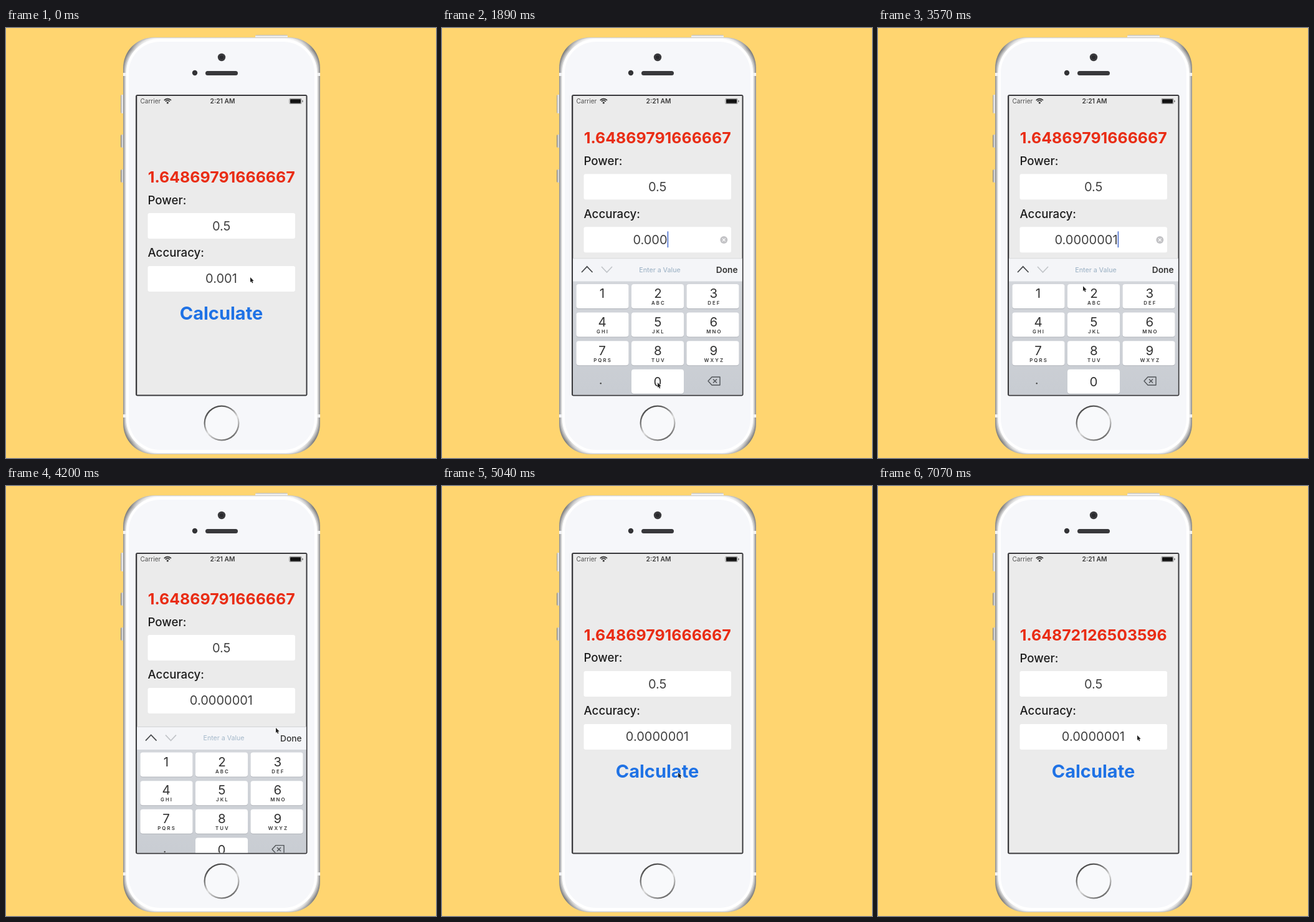
Recreate the animation shown at these times as an HTML page with a canvas. Size 690 px wide and 690 px high, loop 7.14 s.

```html
<!DOCTYPE html>
<html lang="en">
<head>
<meta charset="utf-8">
<title>Power calculator</title>
<style>
html, body { margin: 0; width: 100%; height: 100%; overflow: hidden; background: #ffd570; }
canvas { display: block; width: 690px; height: 690px; filter: blur(0.45px); }
</style>
</head>
<body>
<canvas id="stage" width="690" height="690"></canvas>
<script>
const ctx = document.getElementById('stage').getContext('2d');
const LOOP = 7140, STEP = 70;
const FOCUS = 320, BLUR = 4175, PRESS = 5600, RELEASE = 5740;

// [time, text] of the accuracy field
const edits = [
  [FOCUS, '0.001'], [1260, '0.00'], [1890, '0.000'], [2030, '0.0000'],
  [2200, '0.00000'], [2380, '0.000000'], [3220, '0.0000001']
];

// [time, x, y] of the pointer tip
const path = [
  [0, 392, 400], [420, 392, 400], [910, 447, 538], [1120, 438, 565],
  [1400, 438, 565], [1750, 346, 569], [2450, 346, 569], [2800, 279, 533],
  [3080, 258, 430], [3400, 258, 430], [3850, 446, 388], [4060, 441, 387],
  [4200, 433, 388], [4830, 379, 460], [6300, 379, 460], [7070, 416, 400]
];

const clamp = v => Math.max(0, Math.min(1, v));
const mix = (a, b, k) => a + (b - a) * k;

function spring(ms) {
  const w = 0.018 * Math.max(0, ms);
  return 1 - (1 + w) * Math.exp(-w);
}

function text(str, x, y, size, weight, color, align = 'left', spacing = 0) {
  ctx.font = `${weight} ${size}px Inter, Roboto, sans-serif`;
  ctx.letterSpacing = spacing + 'px';
  ctx.textAlign = align;
  ctx.fillStyle = color;
  ctx.fillText(str, x + (align === 'center' ? spacing / 2 : 0), y);
  ctx.letterSpacing = '0px';
}

function box(x, y, w, h, r, fill) {
  ctx.beginPath();
  ctx.roundRect(x, y, w, h, r);
  ctx.fillStyle = fill;
  ctx.fill();
}

function disc(x, y, r, fill) {
  ctx.beginPath();
  ctx.arc(x, y, r, 0, Math.PI * 2);
  ctx.fillStyle = fill;
  ctx.fill();
}

function line(points, color, width, close) {
  ctx.beginPath();
  points.forEach(([x, y]) => ctx.lineTo(x, y));
  if (close) ctx.closePath();
  ctx.strokeStyle = color;
  ctx.lineWidth = width;
  ctx.stroke();
}

function gradient(x0, y0, x1, y1, stops) {
  const g = ctx.createLinearGradient(x0, y0, x1, y1);
  stops.forEach(([at, color]) => g.addColorStop(at, color));
  return g;
}

function phone() {
  ctx.fillStyle = '#ffd570';
  ctx.fillRect(0, 0, 690, 690);

  box(184, 107, 7, 30, 2, gradient(184, 0, 190, 0, [[0, '#99958c'], [0.4, '#f2f2f2'], [1, '#a5a5a5']]));
  const volume = gradient(184, 0, 190, 0, [[0, '#77746e'], [0.45, '#e6e6e6'], [1, '#707070']]);
  box(184, 171, 7, 21, 2, volume);
  box(184, 227, 7, 21, 2, volume);
  box(400, 11, 52, 8, 2, gradient(0, 11, 0, 17, [[0, '#b9b4a6'], [0.4, '#f6f6f6'], [1, '#bbb']]));

  // metal rim, thicker and darker around the corners
  const rim = 5;
  for (let k = 0; k < rim; k++) {
    const gray = add => {
      const v = Math.min(252, mix(125, 235, k / rim) + add);
      return `rgb(${v},${v},${v})`;
    };
    box(188 + k, 15 + k * 0.5, 316 - 2 * k, 669 - k, 49 + k, gradient(0, 15, 0, 684, [
      [0, gray(75)], [0.03, gray(0)], [0.1, gray(25)],
      [0.9, gray(25)], [0.97, gray(0)], [1, gray(65)]
    ]));
  }
  box(193, 17.5, 306, 664, 54, '#ffffff');
  box(197, 22, 298, 655, 50, '#f6f7fa');
  for (const y of [72, 620]) {
    box(188, y, 5, 5, 0, '#f3f3f3');
    box(499, y, 5, 5, 0, '#f3f3f3');
  }

  disc(346, 47, 6.2, '#3a3a3d');
  disc(346, 47, 3, '#29292d');
  disc(303, 72, 4.2, '#333336');
  box(320, 69, 52, 7, 3.5, '#38383b');

  disc(346, 634, 28.5, gradient(330, 606, 362, 662, [
    [0, '#3d3d3d'], [0.3, '#777'], [0.55, '#dedede'], [0.8, '#999'], [1, '#555']
  ]));
  disc(346, 634, 26.2, '#f8f9fb');
  box(208, 107, 275.5, 483.5, 3, '#39393c');
}

function statusBar() {
  text('Carrier', 215.5, 121, 10, 400, '#505050');
  text('2:21 AM', 347.5, 121, 10.3, 600, '#3a3a3a', 'center');
  ctx.strokeStyle = '#333';
  ctx.lineWidth = 1.6;
  for (const r of [4.6, 7.4]) {
    ctx.beginPath();
    ctx.arc(259.3, 121, r, -Math.PI * 0.77, -Math.PI * 0.23);
    ctx.stroke();
  }
  disc(259.3, 120, 1.6, '#333');
  box(454.5, 113, 20, 9, 2, '#777');
  box(455.3, 113.8, 18.4, 7.4, 1.5, '#ebebeb');
  box(456, 114.3, 17, 6.4, 1, '#111');
  box(475.2, 116, 1.5, 3, 0.7, '#777');
}

function resultLabel(str, y) {
  // shrinks to the label width
  ctx.font = '700 100px Inter, Roboto, sans-serif';
  const size = 100 * 236 / ctx.measureText(str).width;
  text(str, 345.7, y, size, 700, '#e92c14', 'center');
}

function caretAlpha(since) {
  if (since < 500) return 1;
  const p = (since - 500) % 1000;
  return p < 500 ? clamp(1 - p / 150) : clamp((p - 500) / 150);
}

function form(t, shift, editing) {
  ctx.save();
  ctx.translate(0, -62.7 * shift);
  resultLabel(t < RELEASE ? '1.64869791666667' : '1.64872126503596', 248);

  text('Power:', 227.5, 282.5, 18.7, 500, '#1c1c1c');
  box(227.5, 297, 236.5, 41, 3, '#fff');
  text('0.5', 345.7, 324.7, 20, 400, '#404040', 'center');

  text('Accuracy:', 227.5, 367.3, 18.7, 500, '#1c1c1c');
  box(227.5, 382, 236.5, 41, 3, '#fff');
  const [when, value] = edits.findLast(e => e[0] <= t) || edits[0];
  text(value, editing ? 334 : 345.4, 409.4, 20, 400, '#404040', 'center');
  if (editing) {
    const x = 334 + ctx.measureText(value).width / 2;
    ctx.globalAlpha = caretAlpha(t - when);
    box(x, 389, 1.6, 26, 0.5, '#4a6fd0');
    ctx.globalAlpha = 1;
    disc(452.3, 402.7, 6, '#c3c3c6');
    line([[450, 400.4], [454.6, 405]], '#fff', 1.2);
    line([[454.6, 400.4], [450, 405]], '#fff', 1.2);
  }

  const fade = t < PRESS ? 1 : t < RELEASE ? 0.2 : mix(0.2, 1, clamp((t - RELEASE) / 350));
  ctx.globalAlpha = fade;
  text('Calculate', 345.5, 468.3, 29, 700, '#1f72e5', 'center');
  ctx.restore();
}

function keyboard(shift, closing) {
  if (shift < 0.001) return;
  ctx.save();
  ctx.translate(0, 220 * (1 - shift));
  box(210, 370, 272, 220, 0, gradient(0, 406, 0, 588, [[0, '#d3d6db'], [1, '#c8ccd2']]));
  box(210, 370, 272, 36.5, 0, '#f4f5f8');
  box(210, 369.5, 272, 0.8, 0, '#d2d3d6');
  line([[224, 392], [232.7, 382.8], [241.5, 392]], '#484a4d', 1.7);
  line([[256, 383], [264.5, 392], [273, 383]], '#c2c5c9', 1.7);
  text('Enter a Value', 349.5, 391.7, 10.6, closing ? 400 : 500, '#a4b8ca', 'center');
  text('Done', 474.5, 393.2, 13.7, closing ? 500 : 600, '#333', 'right');

  const letters = ['', 'ABC', 'DEF', 'GHI', 'JKL', 'MNO', 'PQRS', 'TUV', 'WXYZ'];
  const key = (col, row) => {
    const x = 215.5 + col * 88.5, y = 411 + row * 45.6;
    box(x, y + 1, 84, 39, 4, '#b0b3b9');
    box(x, y, 84, 39, 4, '#fff');
    return [257 + col * 89.4, y];
  };
  letters.forEach((str, i) => {
    const [x, y] = key(i % 3, Math.floor(i / 3));
    text(String(i + 1), x, y + 22.3, 20.5, 400, '#333', 'center');
    text(str, x, y + 33.3, 7.8, 600, '#363636', 'center', 2.1);
  });
  const [x, y] = key(1, 3);
  text('0', x - 0.4, y + 26.7, 20.5, 400, '#333', 'center');
  disc(254.7, 570.3, 1.2, '#444');

  ctx.lineJoin = 'round';
  line([[427, 566.5], [433, 560], [446, 560], [446, 573], [433, 573]], '#505458', 1.4, true);
  line([[435, 563.5], [441, 569.5]], '#505458', 1.4);
  line([[441, 563.5], [435, 569.5]], '#505458', 1.4);
  ctx.restore();
}

function pointer(t) {
  const i = path.findLastIndex(p => p[0] <= t);
  const a = path[i], b = path[i + 1] || a;
  const k = b === a ? 0 : (t - a[0]) / (b[0] - a[0]);
  ctx.save();
  ctx.translate(mix(a[1], b[1], k), mix(a[2], b[2], k));
  ctx.beginPath();
  [[0, 0], [0, 8], [1.8, 6.4], [3, 9.4], [4.4, 8.8], [3.2, 6], [5.6, 5.8]]
    .forEach(([x, y]) => ctx.lineTo(x, y));
  ctx.closePath();
  ctx.lineWidth = 1.2;
  ctx.strokeStyle = 'rgba(255,255,255,.75)';
  ctx.stroke();
  ctx.fillStyle = '#222';
  ctx.fill();
  ctx.restore();
}

function draw(t) {
  const shift = spring(t - FOCUS) - spring(t - BLUR);
  const closing = t >= BLUR;
  phone();
  ctx.save();
  ctx.beginPath();
  ctx.rect(210.3, 109, 271.2, 479.5);
  ctx.clip();
  ctx.fillStyle = '#ebebeb';
  ctx.fillRect(208, 107, 276, 484);
  statusBar();
  form(t, shift, t >= FOCUS && !closing);
  keyboard(shift, closing);
  ctx.restore();
  pointer(t);
}

const start = performance.now();
function tick() {
  const t = (performance.now() - start) % LOOP;
  draw(Math.floor(t / STEP) * STEP);
  requestAnimationFrame(tick);
}
tick();
</script>
</body>
</html>
```
